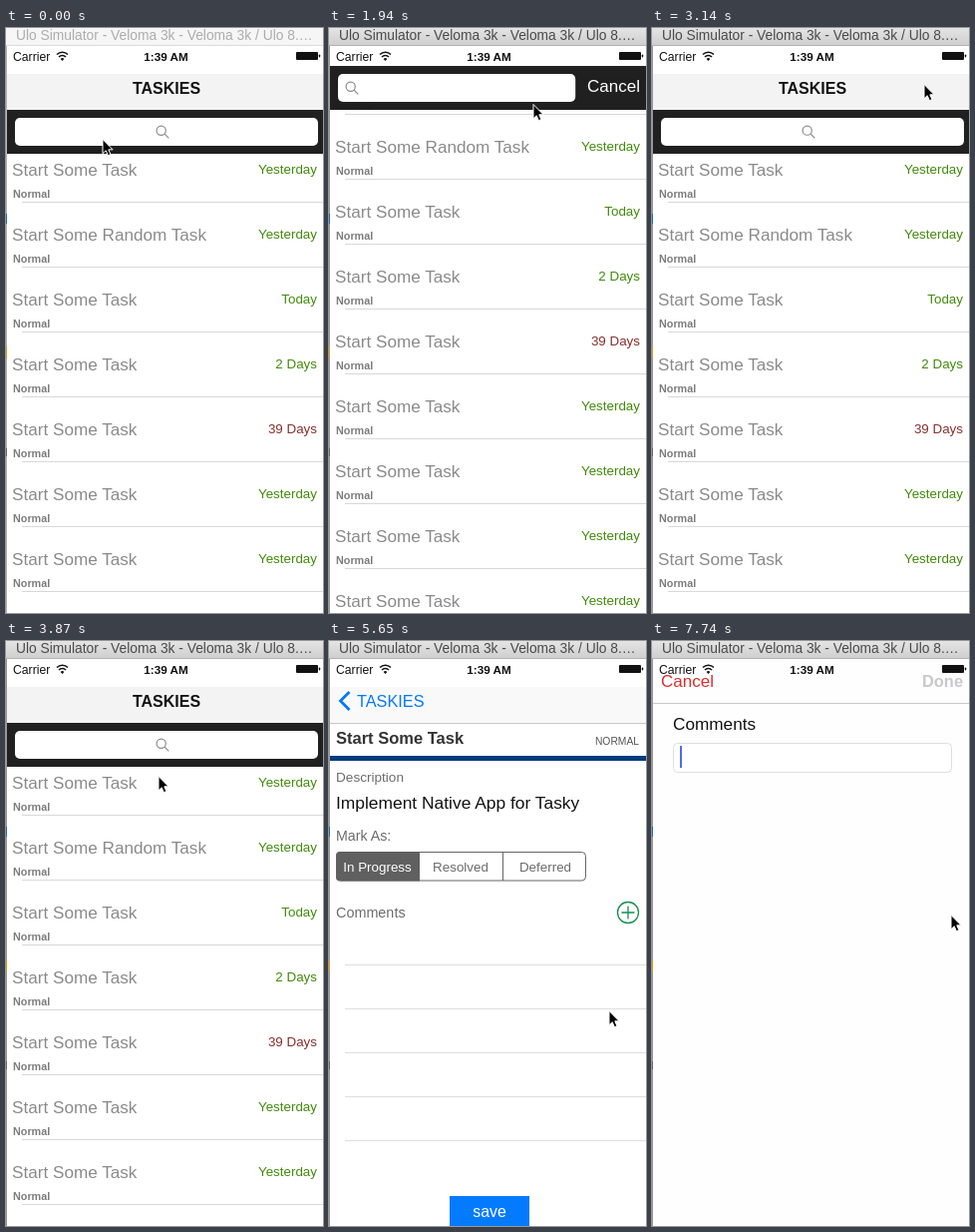
These frames come from a looping animation (318 by 586 pixels, 8 s). An HTML page:

```html
<!DOCTYPE html>
<html lang="en">
<head>
<meta charset="utf-8">
<title>Task list</title>
<style>
  html, body { margin: 0; width: 100%; height: 100%; overflow: hidden; background: #fff; }
  svg { display: block; width: 318px; height: 586px; }
  text { font-family: "Liberation Sans", Arial, sans-serif; white-space: pre; }
</style>
</head>
<body>
<svg id="stage" viewBox="0 0 318 586" xmlns="http://www.w3.org/2000/svg"></svg>
<script>
const LOOP = 8000;
const BLUE = '#0479f8';

const STEPS = [
  0, 140, 290, 440, 590, 1790, 1940, 2090, 2240, 2540,
  2840, 2990, 3140, 3280, 3430, 3580, 3730, 3870, 4320, 4470,
  4770, 4910, 5060, 5210, 5360, 5500, 5650, 5800, 5950, 6100,
  6540, 6690, 6840, 6990, 7140, 7290, 7590, 7740
];

// Pointer path: time, x, y
const POINTER = [
  [0, 97, 111], [1790, 120, 103], [1940, 205, 76], [2090, 289, 57], [2240, 274, 56],
  [2540, 273, 56], [3280, 247, 75], [3430, 215, 97], [3580, 185, 116], [3730, 163, 129],
  [3870, 153, 135], [4320, 150, 137], [4470, 147, 139], [5210, 168, 188], [5360, 205, 255],
  [5500, 250, 325], [5650, 281, 370], [5800, 291, 321], [5950, 296, 291], [6100, 300, 274]
];

const clamp = v => Math.min(1, Math.max(0, v));
const mix = (a, b, k) => a + (b - a) * k;
const smooth = v => { const k = clamp(v); return k * k * (3 - 2 * k); };
const settle = (t, start, tau) => {
  const k = t < start ? 0 : 1 - Math.exp((start - t) / tau);
  return k > 0.995 ? 1 : k;
};

const text = (x, y, size, fill, str, extra = '') =>
  `<text x="${x}" y="${y}" font-size="${size}" fill="${fill}" ${extra}>${str}</text>`;
const rect = (x, y, w, h, fill, extra = '') =>
  `<rect x="${x}" y="${y}" width="${w}" height="${h}" fill="${fill}" ${extra}/>`;
const group = (id, body, extra = '') => `<g id="${id}" ${extra}>${body}</g>`;
const BOLD = 'font-weight="700"';
const END = 'text-anchor="end"';
const MID = 'text-anchor="middle"';

function taskRows() {
  const due = ['Yesterday', 'Yesterday', 'Today', '2 Days', '39 Days'];
  let out = '';
  for (let i = 0; i < 9; i++) {
    const y = 65 * i;
    out += text(6, 148 + y, 17.15, '#8a8a8a', i === 1 ? 'Start Some Random Task' : 'Start Some Task')
      + text(312, 146 + y, 13.4, i === 4 ? '#8a2f2f' : '#418a0c', due[i] || 'Yesterday', END)
      + text(7, 170 + y, 10.8, '#7c7c7c', 'Normal', BOLD)
      + rect(16, 174 + y, 402, 1, '#d8d8d8');
  }
  return out;
}

function detailView() {
  const lines = [324, 368, 412, 456, 500].map(y => rect(16, y, 302, 1, '#dedede')).join('');
  return rect(-5, 82, 6, 504, 'url(#shade)')
    + rect(1, 82, 317, 504, '#fff') + rect(1, 82, 317, 1, '#c8c8c8')
    + text(7, 103, 16.5, '#333', 'Start Some Task', BOLD)
    + text(311, 104, 10.3, '#555', 'NORMAL', END)
    + rect(1, 115, 317, 5, '#043c7e')
    + text(7, 141, 13.6, '#6c6c6c', 'Description')
    + text(7, 168, 17.4, '#111', 'Implement Native App for Tasky')
    + text(7, 200, 14.2, '#6c6c6c', 'Mark As:')
    + rect(7.5, 211.5, 250, 28.5, '#fff', 'rx="4" stroke="#666"')
    + '<path d="M91 211H11a4 4 0 0 0-4 4v21.5a4 4 0 0 0 4 4h80z" fill="#606060"/>'
    + rect(174, 212, 1, 28, '#666')
    + text(48.5, 231, 13.4, '#fff', 'In Progress', MID)
    + text(132, 231, 13.4, '#6c6c6c', 'Resolved', MID)
    + text(217, 231, 13.4, '#6c6c6c', 'Deferred', MID)
    + text(7, 277, 14.4, '#6c6c6c', 'Comments')
    + '<path d="M310.5 272a10.5 10.5 0 1 1-21 0a10.5 10.5 0 1 1 21 0M293.5 272h13M300 265.5v13" fill="none" stroke="#16904f" stroke-width="1.3"/>'
    + lines
    + rect(121, 556, 80, 30, '#047aff') + text(161, 577, 15.9, '#fff', 'save', MID);
}

function modalView() {
  return rect(1, 18, 317, 568, '#fefefe')
    + text(9, 46, 17, '#d8302f', 'Cancel')
    + text(312, 46, 16.4, '#c9c9cb', 'Done', BOLD + ' ' + END)
    + rect(1, 62, 317, 1, '#c8c8c8')
    + text(21, 89, 17.2, '#111', 'Comments')
    + rect(21.5, 102.5, 279, 29, '#fff', 'rx="4" stroke="#dedede"')
    + rect(28, 105, 2, 22, '#4a6fe8', 'id="caret"');
}

const statusBar = text(7, 32.5, 12.2, '#111', 'Carrier')
  + '<path d="M51 26.5a7.8 7.8 0 0 1 11 0M53 29a5 5 0 0 1 7 0" fill="none" stroke="#111" stroke-width="1.6"/>'
  + '<path d="M54.6 31a2.7 2.7 0 0 1 3.8 0l-1.9 2z" fill="#111"/>'
  + text(160.5, 32.5, 11.7, '#111', '1:39 AM', MID + ' ' + BOLD)
  + rect(291, 24, 22, 8, '#111', 'rx="1"') + rect(313.8, 26.5, 1.4, 3, '#111', 'rx=".7"');

document.getElementById('stage').innerHTML =
  '<linearGradient id="chrome" x2="0" y2="1"><stop stop-color="#e4e4e4"/><stop offset="1" stop-color="#cecece"/></linearGradient>'
  + '<linearGradient id="shade"><stop stop-opacity="0"/><stop offset="1" stop-opacity=".06"/></linearGradient>'
  + rect(0, 0, 318, 586, '#fff')
  + group('list', rect(0, 110, 420, 64, '#d9d9d9', 'id="pressed"') + taskRows())
  + group('search',
      rect(1, 82, 420, 44, '#1c1c1c', 'opacity=".98"')
      + rect(9, 90, 304, 28, '#fff', 'rx="5" id="field"')
      + group('lens', '<circle cx="-1.3" cy="-1.3" r="4.6"/><path d="M2.1 2.1L6.3 6.3"/>',
          'fill="none" stroke="#8c8c8c" stroke-width="1.2"')
      + text(259, 108, 17, '#fff', 'Cancel', 'id="cancel"'))
  + rect(1, 82, 317, 504, '#000', 'id="dim"')
  + group('detail', detailView())
  + group('nav',
      rect(1, 18, 317, 28, '#fff') + rect(1, 46, 317, 36, '#f3f3f3', 'id="navBack"')
      + group('back', '<path d="M20.5 51L11.5 60L20.5 69" fill="none" stroke-width="2.8"/>', `stroke="${BLUE}"`)
      + text(28, 66, 16.3, BLUE, 'TASKIES', 'id="backTitle"')
      + text(161, 66, 16, '#111', 'TASKIES', MID + ' ' + BOLD + ' id="heading"'))
  + rect(1, 18, 317, 20, '#fff')
  + group('modal', modalView())
  + statusBar
  + rect(0, 0, 318, 18, '#f6f6f6', 'id="titleBar"')
  + rect(0, 17, 318, 1, '#b2b2b2', 'id="titleLine"')
  + text(10, 12, 13.8, '#aaa', 'Ulo Simulator - Veloma 3k - Veloma 3k / Ulo 8.…', 'id="title"')
  + rect(0, 18, 1, 568, '#999', 'id="edge"')
  + rect(0, 186, 1, 10, '#1c6cb4') + rect(0, 319, 1, 12, '#e39a14') + rect(0, 421, 1, 8, '#666')
  + group('pointer', '<path d="M.5.5v14.2l3.2-3 2.2 5 2.5-1.1-2.1-4.8h4.3z" fill="#000" stroke="#fff" stroke-width="1"/>');

const el = {};
document.querySelectorAll('#stage [id]').forEach(n => el[n.id] = n);
const move = (n, x, y) => n.setAttribute('transform', `translate(${x.toFixed(2)} ${y.toFixed(2)})`);
const alpha = (n, v) => n.setAttribute('opacity', v.toFixed(3));
const show = (n, on) => n.setAttribute('visibility', on ? 'visible' : 'hidden');
const fill = (n, c) => n.setAttribute('fill', c);

function draw(t) {
  const closing = t >= 2795;
  const open = smooth((t - 130) / 350) - smooth((t - 2795) / 350);
  const push = settle(t, 4650, 119);
  const rise = settle(t, 6500, 110);

  const active = t >= 140;
  fill(el.titleBar, active ? 'url(#chrome)' : '#f6f6f6');
  fill(el.title, active ? '#4a4a4a' : '#acacac');
  fill(el.titleLine, active ? '#b2b2b2' : '#dcdcdc');
  fill(el.edge, active ? '#979797' : '#b4b4b4');

  const slide = -96 * push;
  move(el.list, slide, -88 * open);
  move(el.search, slide, -44 * open);
  show(el.pressed, push > 0);
  const width = mix(304, 238.2, open);
  el.field.setAttribute('width', width);
  const centre = 9 + width / 2 - 4;
  move(el.lens, closing ? centre : mix(centre, 23, open), 104);
  move(el.cancel, 65 * (1 - open), 0);
  alpha(el.cancel, closing ? open * 0.12 : open);

  alpha(el.dim, 0.1 * push);
  show(el.detail, push > 0);
  move(el.detail, Math.round(318 * (1 - push)), 0);

  // The heading glides left and turns into the back button's label.
  const glide = 109 * (1 - push);
  move(el.nav, 0, -44 * open);
  fill(el.navBack, push > 0 ? '#f9f9f9' : '#f3f3f3');
  move(el.heading, push > 0 ? glide - 99 : 0, 0);
  alpha(el.heading, (1 - open) * (1 - push));
  alpha(el.back, push ** 4);
  move(el.backTitle, glide, 0);
  alpha(el.backTitle, push);

  show(el.modal, rise > 0);
  move(el.modal, 0, 568 * (1 - rise));
  show(el.caret, t >= 7590);
  alpha(el.caret, t >= 7740 ? 1 : 0.5);

  const [, x, y] = POINTER.findLast(p => p[0] <= t);
  move(el.pointer, x - 0.5, y);
}

const start = performance.now();
function tick() {
  const t = Math.max(0, performance.now() - start) % LOOP;
  draw(STEPS.findLast(s => s <= t));
  requestAnimationFrame(tick);
}
tick();
</script>
</body>
</html>
```
